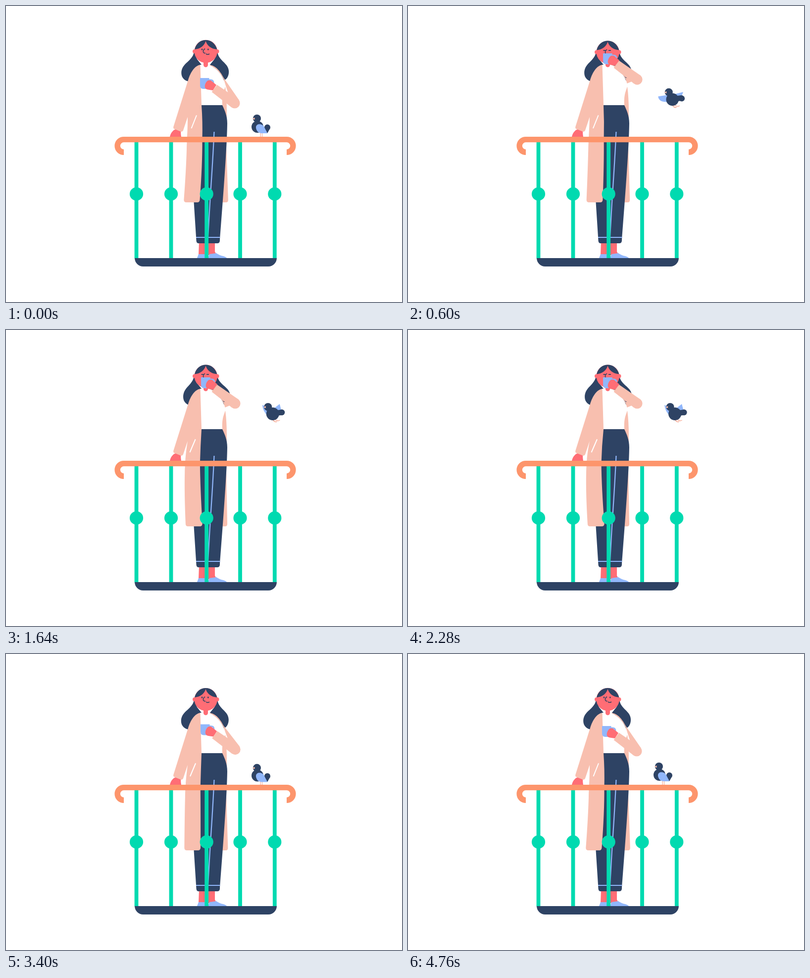
Write an HTML page with a canvas that moves like this. It is 800 px wide and 600 px high and loops after 4.8 s.

```html
<!DOCTYPE html>
<html lang="en">
<head>
<meta charset="utf-8">
<title>Coffee on the balcony</title>
<style>
  html, body { margin: 0; width: 100%; height: 100%; overflow: hidden; background: #fff; }
  canvas { display: block; }
</style>
</head>
<body>
<canvas id="stage" width="800" height="600"></canvas>
<script>
const ctx = document.getElementById('stage').getContext('2d');
const LOOP = 4800;
const NAVY = '#2e4364', COAT = '#f8bfaf', SKIN = '#ff6d75', BLUE = '#91b7fb',
      GREEN = '#00dab0', RAIL = '#fd956c', WHITE = '#fff';

const fill = (color, d) => { ctx.fillStyle = color; ctx.fill(new Path2D(d)); };
const line = (color, width, d) => {
  ctx.strokeStyle = color;
  ctx.lineWidth = width;
  ctx.stroke(new Path2D(d));
};
const dot = (color, x, y, rx, ry = rx) => {
  ctx.fillStyle = color;
  ctx.beginPath();
  ctx.ellipse(x, y, rx, ry, 0, 0, 7);
  ctx.fill();
};
const at = (x, y, draw) => {
  ctx.save();
  ctx.translate(x, y);
  draw();
  ctx.restore();
};

const mix = (a, b, k) => a + (b - a) * k;
const ramp = (t, from, to) => Math.min(1, Math.max(0, (t - from) / (to - from)));
const ease = u => u < .5 ? 4 * u ** 3 : 1 - 4 * (1 - u) ** 3;
const bump = (t, from, to) => Math.sin(Math.PI * ramp(t, from, to));
// Slow swing over one loop, 1 at the peak time and -1 half a loop later
const sway = (t, peak) => Math.cos(2 * Math.PI * (t - peak) / LOOP);

function drawHair(t) {
  const h = 1.5 + 2.5 * sway(t, 1600), l = 354 + h, r = 450 + h * .7;
  fill(NAVY, `M380 92C378 112 ${l} 115 ${l} 136C${l} 146 ${l + 8} 153 ${l + 17} 153L395 119L386 108Z`);
  fill(NAVY, `M427 92C429 112 ${r} 115 ${r} 133C${r} 143 ${r - 5} 151 ${r - 13} 151L412 119L421 108Z`);
}

function drawLegs() {
  fill(SKIN, 'M390 478H409V505H389ZM408 478H422V498L426 505H408Z');
  fill(BLUE, 'M386 511L389 503H409V511ZM408 511L411 503L425 501Q432 506 439 507Q445 509 446 511Z');
  fill(NAVY, 'M372 201H437C442 212 447 222 447 238C446 300 436 420 432 476q-.5 5-5 5H389q-4 0-4.5-5L379 390Z');
  line(BLUE, 2.2, 'M420.5 255Q418 310 412.5 390L408 469');
  line(BLUE, 2, 'M384 469H432.5');
}

function drawCoatFront(hem, mid) {
  const left = 359 + 4 * hem, right = 391 + 6 * hem;
  const front = 397 - 6 * mid, side = 366 - 5 * mid;
  fill(SKIN, 'M331 265C333 256 339 250 344 250L353 254Q353 261 354 265Z');
  fill(COAT, `M393 119C381 121 373 134 368 150L338.5 244q-1.5 4 2 5.500L353 254.500q3.500 1 5-2.500
    L367 225C${side + 1} 250 ${side} 260 ${side - 1} 290Q${side - 2} 330 ${left} 393q0 5 5 5
    H${right - 5}q4.500 0 5-5Q${front} 320 ${front - .5} 270Q${front + .5} 235 395 201L392.500 119Z`);
  line(WHITE, 2, `M${374.5 - 4 * mid} 248L${385 - 3 * mid} 221.500`);
}

function drawHead(lift) {
  const closed = lift > .75, sipping = lift > .25;
  fill(SKIN, 'M399 108H408V119.500a4.500 4.500 0 0 1-9 0Z');
  at(0, 1.6 * lift, () => {
    dot(SKIN, 381, 92, 4);
    dot(SKIN, 426.5, 92, 4);
    dot(SKIN, 403.7, 92, 23.2);
    fill(NAVY, 'M381 88C384 76 393 69 403.500 69C414 69 423 76 426.500 88C414 87 406 80 403.500 71C401 80 393 87 381 88Z');
    if (closed) {
      line(NAVY, 1.6, 'M394.500 88.500H399M405 88.500H410');
    } else {
      dot(NAVY, 396, 88, 1.3, 1.8);
      dot(NAVY, 408.3, 88, 1.3, 1.8);
    }
    line(NAVY, 1.6, 'M402 86.500C397 90 397 96 403 95.500');
    if (sipping) dot(NAVY, 407, 97.5, 1.7);
    else line(NAVY, 1.6, 'M404 97Q407.500 99.500 411 97');
  });
}

function drawUpperArm(ex, ey) {
  fill(COAT, `M410 119C425 121 433 133 440 146L${ex + 9} ${ey - 6}L${ex - 6} ${ey + 2}L442.500 157C440 146 431 129 410 119Z`);
}

function drawForearm(ex, ey, swing, lift) {
  at(392 + 2 * lift + 4 * swing, 146 - 50 * lift, () => {
    line(BLUE, 2.8, 'M18 4H21Q27 4 27 10Q27 15 18 16');
    fill(BLUE, 'M0 0H18.500V15Q18.500 22 12 22H6.500Q0 22 0 15Z');
    fill(SKIN, 'M10 14C12 6 17 3 22 5L33 14L26 25L16 23.500C10 23 9 18 10 14Z');
  });
  const cx = 421 + 2 * swing, cy = 167 - 49 * lift;
  const len = Math.hypot(ex - cx, ey - cy);
  const nx = (cy - ey) / len, ny = (ex - cx) / len;
  const edge = (x, y, w) => `${x + nx * w} ${y + ny * w}`;
  fill(COAT, `M${edge(cx, cy, 9)}L${edge(ex, ey, 10.6)}L${edge(ex, ey, -10.6)}L${edge(cx, cy, -9)}Z`);
  dot(COAT, ex, ey, 10.6);
}

function drawWoman(t) {
  const lift = ease(ramp(t, 0, 640)) - ease(ramp(t, 2840, 3600));
  const swing = Math.sin(Math.PI * lift);
  const hem = .5 + .5 * sway(t, 1950), mid = .5 + .5 * sway(t, 2400);
  const ex = 462 + lift + 4.5 * swing, ey = 197 - 48 * lift;
  const tail = 449 - 2 * hem;

  drawHair(t);
  fill(COAT, `M443 163Q446 185 446 215L445 285L${tail} 393q0 5-4 5H437L430 200Z`);
  drawLegs();
  fill(WHITE, 'M392 119H410C431 128 441 146 443 163C438 176 436 185 437 201H392Z');
  drawUpperArm(ex, ey);
  drawCoatFront(hem, mid);
  drawHead(lift);
  drawForearm(ex, ey, swing, lift);
}

function drawBird(t) {
  const landing = ease(ramp(t, 2640, 3320));
  const fly = ease(ramp(t, 360, 760)) - landing;
  const dip = 2.5 * bump(t, 140, 460) + 1.5 * bump(t, 3300, 3560);
  const flap = Math.cos(2 * Math.PI * (t - 1640) / 320);
  const airborne = fly > .04;
  const x = mix(508, 543, fly) - 4.5 * bump(t, 800, 3000);
  const y = mix(245, 170, fly) + dip + fly * (1 - flap) * .8;
  const reach = ramp(t, 2500, 2840);

  if (!airborne) line(COAT, 1.6, 'M514 255V265M517.500 255V265');
  at(x, y, () => {
    if (airborne) {
      const fold = 8 * Math.abs(flap);
      const leftX = -29 + fold, leftY = -6 - 12 * flap;
      fill(BLUE, `M-4-10L${leftX} ${leftY}Q${leftX + 1} ${leftY + 12} -10 5Z`);
      fill(BLUE, `M1-10L${22 - fold} ${-15 - 5 * flap}L18-5Z`);
      ctx.lineCap = 'round';
      line('#f8a994', 1.5, `M-2 11L${mix(1, -4, reach)} 13Q${mix(4, 0, reach)} 17 ${mix(8, -2, reach)} ${mix(16, 19, reach)}
        M4 11L${mix(7, 3, reach)} 13Q${mix(11, 7, reach)} 15 ${mix(14, 5, reach)} ${mix(13, 18, reach)}`);
      line(NAVY, 11, 'M2-1L18-3');
      ctx.lineCap = 'butt';
    }
    const hx = mix(-1, -9.5, fly), hy = mix(-17, -14, fly) + dip;
    dot(NAVY, 0, 0, mix(12, 13, fly));
    dot(NAVY, hx, hy, 8);
    dot(NAVY, mix(20, 18.5, fly), mix(1, -3, fly), 6);
    if (!airborne) {
      fill(NAVY, 'M14 2L20 13L26 2Z');
      fill(BLUE, 'M-3 2C-4-7 8-8 13-1L20 13H8C1 12-2 8-3 2Z');
    }
    fill(COAT, `M${hx - 9.5} ${hy + .5}l5-2.500v4.500Z`);
  });
}

function drawBalcony() {
  for (const x of [263.5, 333.5, 405.2, 473, 542.8]) {
    line(GREEN, 7.8, `M${x} 274V512`);
    dot(GREEN, x, 381, 13.6);
  }
  line(RAIL, 11.4, 'M238 296.400A12.900 12.900 0 0 1 238 270.600H567A12.900 12.900 0 0 1 567 296.400');
  fill(NAVY, 'M260 511H547A17 17 0 0 1 530 528H277A17 17 0 0 1 260 511Z');
}

function render(now) {
  const t = now % LOOP;
  ctx.fillStyle = WHITE;
  ctx.fillRect(0, 0, 800, 600);
  drawWoman(t);
  drawBird(t);
  drawBalcony();
}

const start = performance.now();
function tick() {
  render(performance.now() - start);
  requestAnimationFrame(tick);
}
tick();
</script>
</body>
</html>
```
